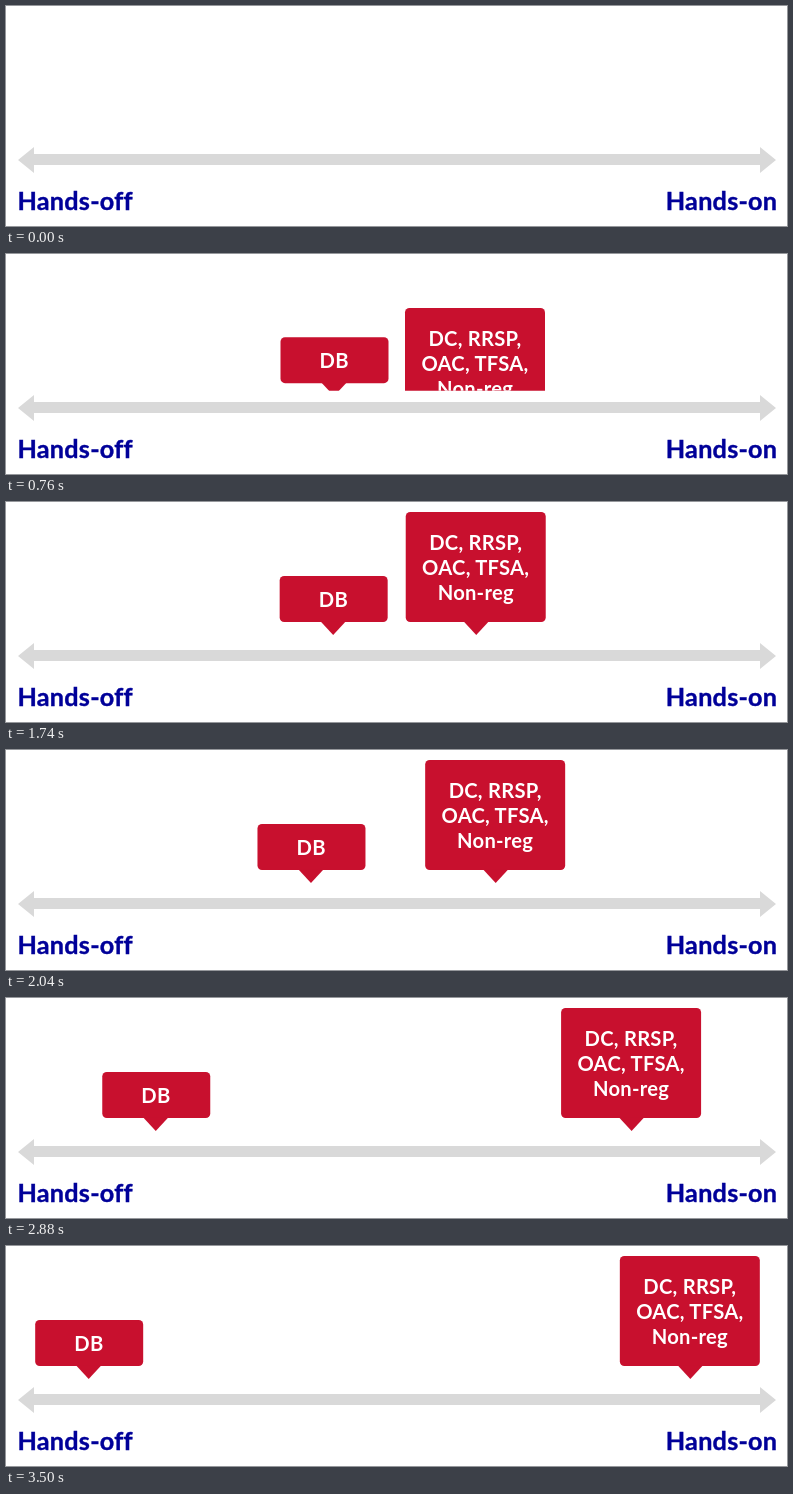
An HTML page that plays this animation: 781x220 px, repeating every 3.96 s.

```html
<!DOCTYPE html>
<html lang="en">
<head>
<meta charset="utf-8">
<title>Hands-off to hands-on</title>
<style>
  html, body { margin: 0; width: 100%; height: 100%; overflow: hidden; background: #fff; }
  svg { display: block; }
  text {
    font: 700 20.2px Lato, sans-serif; font-variant-ligatures: none;
    letter-spacing: .25px; fill: #fff; text-anchor: middle;
  }
  .end { font-size: 25.2px; fill: #000099; stroke: #000099; stroke-width: .4; text-anchor: start; }
  .right { text-anchor: end; }
  .tag { fill: #c8102e; }
</style>
</head>
<body>
<svg width="781" height="220" viewBox="0 0 781 220">
  <clipPath id="above"><rect width="781" height="136.7"/></clipPath>
  <path fill="#d9d9d9" d="M12 154L28 141V148H754V141L770 154L754 167V159H28V167Z"/>
  <text class="end" x="11.5" y="204">Hands-off</text>
  <text class="end right" x="771.3" y="204">Hands-on</text>
  <g clip-path="url(#above)">
    <g id="db">
      <rect class="tag" y="74" width="108" height="46" rx="4.5"/>
      <path class="tag" d="M41 119.5H66L53.5 133Z"/>
      <text x="53.7" y="105">DB</text>
    </g>
    <g id="dc">
      <rect class="tag" y="10" width="140" height="110" rx="4.5"/>
      <path class="tag" d="M58 119.5H83L70.5 133Z"/>
      <text x="70" y="48">DC, RRSP,</text>
      <text x="70" y="73">OAC, TFSA,</text>
      <text x="70" y="98">Non-reg</text>
    </g>
  </g>
</svg>
<script>
  const LOOP = 3960, DEPTH = 141, RISE = 952;
  const tags = [
    { el: document.getElementById('db'), from: 274.5, to: 29, landed: 917 },
    { el: document.getElementById('dc'), from: 399, to: 614, landed: 1120 }
  ];

  // Sine ease-in-out between two times
  function ease(t, start, end) {
    const p = Math.min(1, Math.max(0, (t - start) / (end - start)));
    return (1 - Math.cos(Math.PI * p)) / 2;
  }

  const began = performance.now();

  function draw() {
    const t = (performance.now() - began) % LOOP;
    const slide = ease(t, 1672, 3534);
    for (const { el, from, to, landed } of tags) {
      const x = from + (to - from) * slide;
      const y = DEPTH * (1 - ease(t, landed - RISE, landed));
      el.setAttribute('transform', `translate(${x.toFixed(2)} ${y.toFixed(2)})`);
    }
    requestAnimationFrame(draw);
  }
  draw();
</script>
</body>
</html>
```
